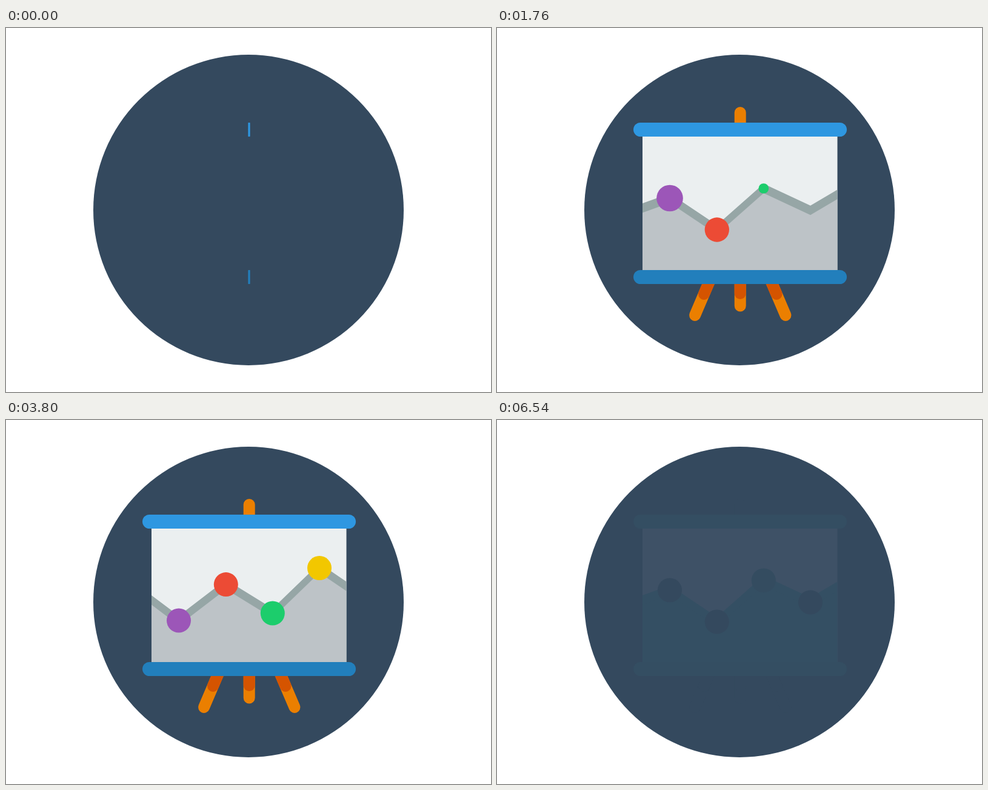
An HTML page with a canvas for the animation above (7200 ms loop, 800 by 600 pixels).

```html
<!DOCTYPE html>
<html lang="en">
<head>
<meta charset="utf-8">
<title>Presentation board</title>
<style>
  html, body { margin: 0; width: 100%; height: 100%; overflow: hidden; background: #fff; }
  canvas { display: block; }
</style>
</head>
<body>
<canvas id="stage" width="800" height="600"></canvas>
<script>
const ctx = document.getElementById('stage').getContext('2d');
const LOOP = 7200;
const BACK = '#34495e';

const FULL = {
  top: '#2e97e1', bottom: '#227fbc', paper: '#ebeff0', area: '#bdc3c7', line: '#96a6a6',
  leg: '#eb7f00', shade: '#d55400', dots: ['#9c56b8', '#ec4b35', '#1ccd6c', '#f2c700']
};
const FAINT = {
  top: '#344e62', bottom: '#344e62', paper: '#3e5166', area: '#344f63', line: '#344f63',
  leg: BACK, shade: BACK, dots: [BACK, BACK, '#344c60', BACK]
};

const LEFT = 240, RIGHT = 561.5, ROOF = 179, FLOOR = 399, MID = 401;

// Each dot: x, resting y, travel to the mirrored pose
const DOTS = [
  [285, 280.5, 51], [362.8, 332.5, -62.5], [439.8, 264.5, 55], [517, 300.5, -57.5]
];
// Each leg: start time, foot, unit vector of growth, length, shaded span measured from the foot
const LEGS = [
  { at: 745, x: 326.5, y: 473.5, dx: -0.393, dy: 0.92, len: 120, from: 38, to: 110 },
  { at: 895, x: 476, y: 473.5, dx: 0.393, dy: 0.92, len: 120, from: 38, to: 110 },
  { at: 1035, x: 401.2, y: 458, dx: 0, dy: 1, len: 318.5, from: 20.5, to: 259 }
];
const SWINGS = [2250, 2595, 3000, 3670, 5060];

const part = (t, start, dur) => Math.min(1, Math.max(0, (t - start) / dur));
const quadOut = p => 1 - (1 - p) ** 2;
const quadInOut = p => p < 0.5 ? 2 * p * p : 1 - 2 * (1 - p) ** 2;
const backOut = p => 1 + 2.70158 * (p - 1) ** 3 + 1.70158 * (p - 1) ** 2;

function disc(x, y, r, color) {
  if (r <= 0) return;
  ctx.fillStyle = color;
  ctx.beginPath();
  ctx.arc(x, y, r, 0, Math.PI * 2);
  ctx.fill();
}

function rod(x1, y1, x2, y2, color) {
  ctx.strokeStyle = color;
  ctx.lineWidth = 19;
  ctx.lineCap = 'round';
  ctx.beginPath();
  ctx.moveTo(x1, y1);
  ctx.lineTo(x2, y2);
  ctx.stroke();
}

function bar(y, scale, color) {
  if (scale <= 0) return;
  ctx.save();
  ctx.translate(MID, y);
  ctx.scale(scale, 1);
  ctx.fillStyle = color;
  ctx.beginPath();
  ctx.moveTo(-164.5, 0);
  ctx.lineTo(164.5, 0);
  ctx.arc(164.5, 11.5, 11.5, -Math.PI / 2, Math.PI / 2);
  ctx.lineTo(-164.5, 23);
  ctx.arc(-164.5, 11.5, 11.5, Math.PI / 2, Math.PI * 1.5);
  ctx.fill();
  ctx.restore();
}

function drawLeg(leg, t, colors) {
  if (t < leg.at) return;
  const off = 90 * (1 - quadOut(part(t, leg.at, 500)));
  const point = d => [leg.x - leg.dx * (off + d), leg.y - leg.dy * (off + d)];
  rod(...point(0), ...point(leg.len), colors.leg);
  rod(...point(leg.from), ...point(leg.to), colors.shade);
}

// 0 at rest, 1 in the mirrored pose
function swing(t) {
  for (let i = 0; i < SWINGS.length - 1; i++) {
    if (t >= SWINGS[i] && t < SWINGS[i + 1]) {
      const p = quadInOut(part(t, SWINGS[i], SWINGS[i + 1] - SWINGS[i]));
      return i % 2 ? 1 - p : p;
    }
  }
  return 0;
}

function below(points, shift, color) {
  ctx.fillStyle = color;
  ctx.beginPath();
  ctx.moveTo(LEFT, FLOOR);
  for (const [x, y] of points) ctx.lineTo(x, y + shift);
  ctx.lineTo(RIGHT, FLOOR);
  ctx.fill();
}

function drawChart(t, colors) {
  const s = swing(t);
  const spots = DOTS.map(([x, y, d]) => [x, y + d * s]);
  const points = [[LEFT, 296.7], ...spots, [RIGHT, 274.2]];
  const shown = quadInOut(part(t, 1050, 450));
  if (shown > 0) {
    ctx.save();
    ctx.beginPath();
    ctx.rect(LEFT, ROOF, (RIGHT - LEFT) * shown, FLOOR - ROOF);
    ctx.clip();
    below(points, -7.8, colors.line);
    below(points, 7.8, colors.area);
    ctx.restore();
  }
  spots.forEach(([x, y], i) => {
    disc(x, y, 20 * backOut(part(t, 1500 + i * 110, 400)), colors.dots[i]);
  });
}

function draw(t) {
  const faint = t >= 6540;
  const colors = faint ? FAINT : FULL;
  ctx.fillStyle = '#fff';
  ctx.fillRect(0, 0, 800, 600);
  disc(400, 300, 256, BACK);

  for (const leg of LEGS) drawLeg(leg, t, colors);
  const drop = quadInOut(part(t, 250, 490));
  ctx.fillStyle = colors.paper;
  ctx.fillRect(LEFT, ROOF, RIGHT - LEFT, (FLOOR - ROOF) * drop);
  drawChart(t, colors);
  const wide = backOut(part(t, 0, 500));
  bar(156, wide, colors.top);
  bar(399, wide, colors.bottom);

  if (t > 6015 && !faint) {
    ctx.globalAlpha = quadOut(part(t, 6015, 685));
    disc(400, 300, 254, BACK);
    ctx.globalAlpha = 1;
  }
}

const begin = performance.now();
function tick(now) {
  draw(Math.max(0, now - begin) % LOOP);
  requestAnimationFrame(tick);
}
draw(0);
requestAnimationFrame(tick);
</script>
</body>
</html>
```
